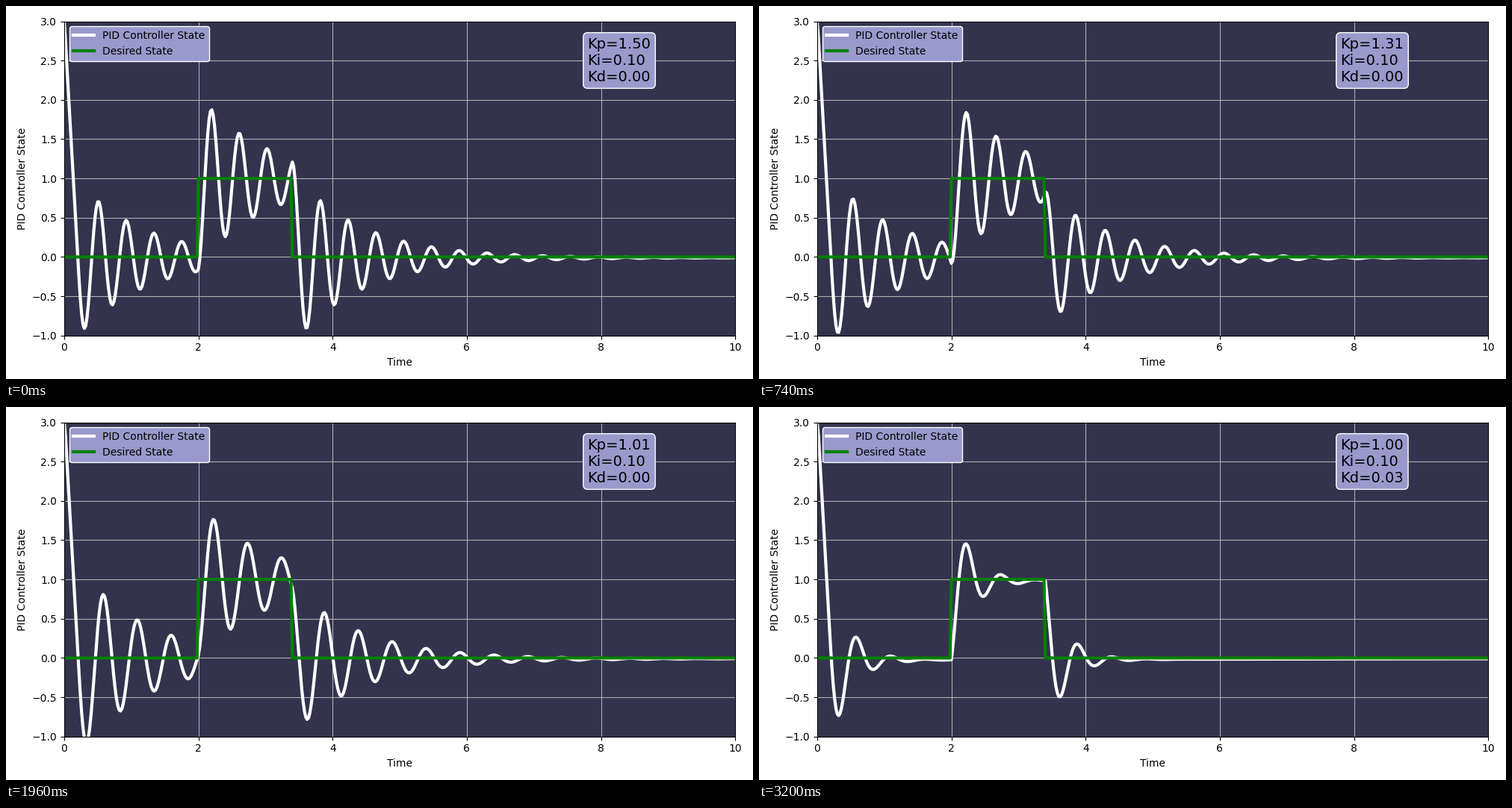
Recreate the animation shown at these times as a matplotlib script. Size 1000x500 px, loop 5 s.

```python
import numpy as np
import matplotlib.pyplot as plt
from matplotlib.animation import FuncAnimation

DT = 0.02
FRAMES = 250
KI = 0.1
GAIN, DRAG, MAX_SPEED = 150.0, 2.0, 15.0
PANEL = (0.6, 0.6, 0.8)

time = np.arange(500) * DT
step = np.arange(500)
desired = np.where((step >= 100) & (step < 170), 1.0, 0.0)


def gains(frame):
    """Lower Kp first, then raise Kd, then hold."""
    kp = (300 - min(frame, 100)) / 200
    kd = min(max(frame - 100, 0), 60) / 2000
    return kp, kd


def simulate(kp, kd):
    """Speed-limited mass with drag, driven by the PID output."""
    x, speed, integral = 3.0, 0.0, 0.0
    last_error = desired[0] - x
    states = []
    for goal in desired:
        states.append(x)
        error = goal - x
        integral += error * DT
        output = kp * error + KI * integral + kd * (error - last_error) / DT
        last_error = error
        speed += (GAIN * output - DRAG * speed) * DT
        speed = min(max(speed, -MAX_SPEED), MAX_SPEED)
        x += speed * DT
    return states


def label(kp, kd):
    return f"Kp={kp:.2f}\nKi={KI:.2f}\nKd={kd:.2f}"


fig, ax = plt.subplots(figsize=(10, 5), dpi=100)
ax.set_facecolor((0.2, 0.2, 0.3))
ax.set_xlim(0, 10)
ax.set_ylim(-1, 3)
ax.set_xlabel("Time")
ax.set_ylabel("PID Controller State")
ax.grid(True)

start = gains(0)
state_line, = ax.plot(time, simulate(*start), color="white", lw=3,
                      label="PID Controller State")
ax.plot(time, desired, color="green", lw=3, label="Desired State")
ax.legend(loc="upper left", facecolor=PANEL, edgecolor="white", framealpha=1)
readout = ax.text(0.78, 0.95, label(*start), transform=ax.transAxes,
                  fontsize=14, va="top",
                  bbox=dict(boxstyle="round", facecolor=PANEL,
                            edgecolor="white"))
fig.tight_layout()


def update(frame):
    kp, kd = gains(frame)
    state_line.set_ydata(simulate(kp, kd))
    readout.set_text(label(kp, kd))
    return state_line, readout


anim = FuncAnimation(fig, update, frames=FRAMES, interval=20, repeat=True)
plt.show()
```
